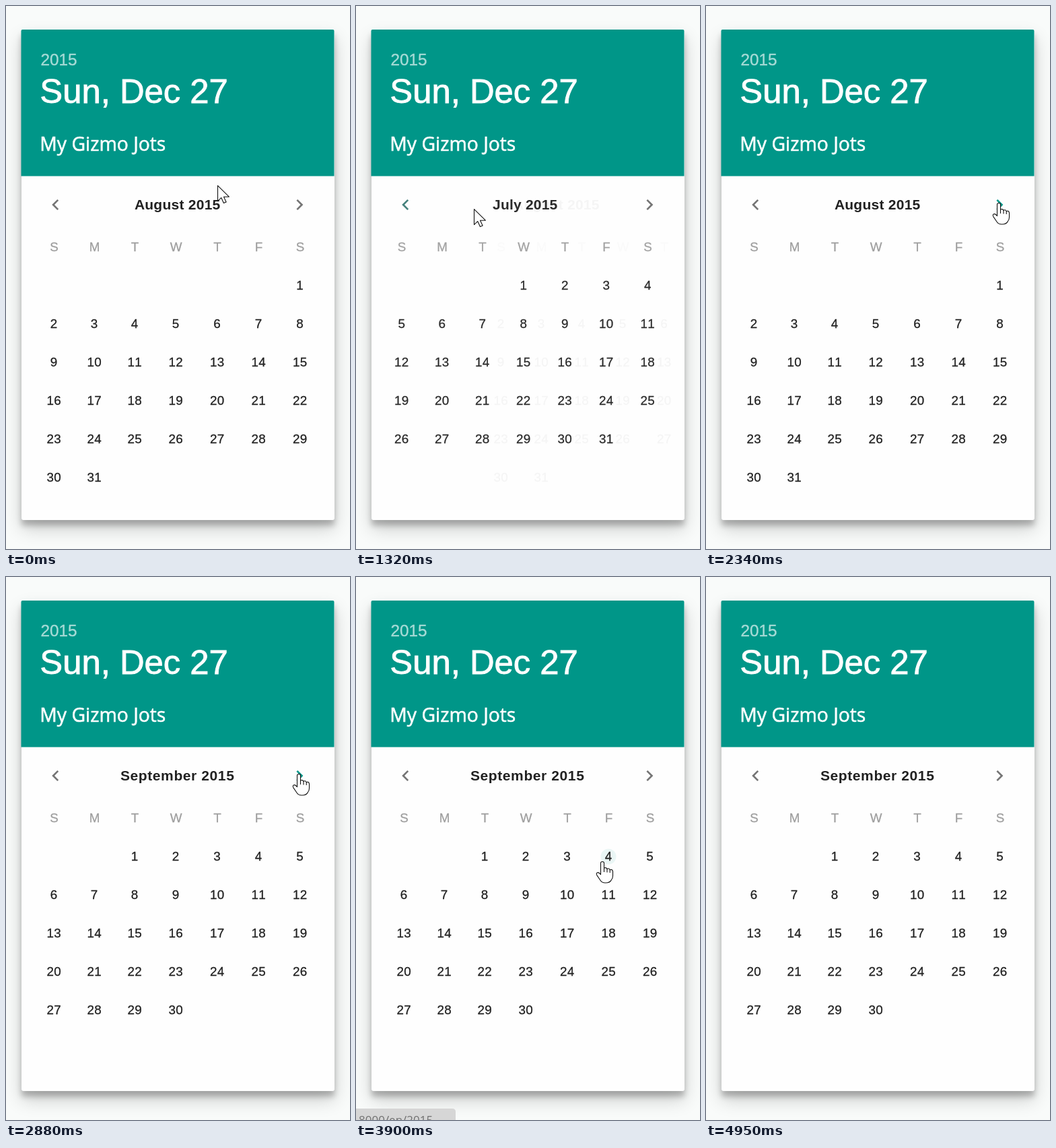
Write an HTML page that moves like this. It is 511 px wide and 806 px high and loops after 5220 ms.

```html
<!DOCTYPE html>
<html lang="en">
<head>
<meta charset="utf-8">
<title>Calendar</title>
<style>
  html, body { margin: 0; width: 100%; height: 100%; overflow: hidden; background: #f9fbfa; }
  .card {
    position: absolute; left: 22.5px; top: 35px; width: 465px; height: 728px;
    border-radius: 3px; background: #fefefe;
    box-shadow: 0 13px 27px rgba(0,0,0,.19), 0 8px 8px rgba(0,0,0,.23);
  }
  svg { position: absolute; left: 0; top: 0; display: block; }
  text { font-family: "Liberation Sans", Arial, sans-serif; font-kerning: none; }
  .mid { text-anchor: middle; }
  .day { font-size: 18.8px; letter-spacing: .3px; fill: #212121; stroke: #212121; stroke-width: .3; }
  .week { font-size: 18.8px; fill: #9e9e9e; stroke: #9e9e9e; stroke-width: .3; }
  .title { font-size: 21px; font-weight: bold; fill: #212121; }
  .head { fill: #fff; stroke: #fff; }
  .sans { font-family: "Open Sans", "Noto Sans", sans-serif; }
</style>
</head>
<body>
<div class="card"></div>
<svg id="stage" width="511" height="806" viewBox="0 0 511 806">
  <defs><clipPath id="pane"><rect x="40" y="256" width="430" height="480"/></clipPath></defs>
  <path d="M22.5 252.6V37q0-2 2-2h461q2 0 2 2V252.6z" fill="#009688"/>
  <text class="head" x="51.4" y="88" font-size="24.3" stroke-width=".4" opacity=".65">2015</text>
  <text class="head" x="50.3" y="144" font-size="50.8" stroke-width=".9">Sun, Dec 27</text>
  <text class="head sans" x="50.3" y="215" font-size="28.3" font-weight="500" stroke-width=".6">My Gizmo Jots</text>
  <g id="dots" fill="#009688"></g>
  <g id="months" clip-path="url(#pane)"></g>
  <path id="prev" transform="translate(57.4 278.8) scale(1.35)" d="M15.41 7.41L14 6l-6 6 6 6 1.41-1.41L10.83 12z"/>
  <path id="next" transform="translate(419.8 278.8) scale(1.35)" d="M10 6L8.59 7.41 13.17 12l-4.58 4.59L10 18l6-6z"/>
  <g id="status">
    <path d="M0 789H143q5 0 5 5V806H0z" fill="#d6d6d6"/>
    <text class="sans" x="4" y="812" font-size="17" fill="#707070">8000/en/2015</text>
  </g>
  <g id="cursor" fill="#fff" stroke="#111" stroke-width="1.1" stroke-linejoin="round">
    <path id="arrow" d="M.5.6V23.6L5.7 18.6 9.4 26.6 13.1 25 9.5 17.2H17.3z"/>
    <g id="hand">
      <path d="M-2.5 2.8Q-2.5.5 0 .5T2.5 2.8V10.5Q3.4 9.4 5 9.6T7 11.6Q7.6 10.5 9.2 10.8T11.2 13Q12 12 13.6 12.4T15.5 15V21.5Q15.5 25 13.4 27.5 11.5 32 4.5 32-.8 32-3 28.2L-8.2 20.6Q-9.6 17.6-7.4 16.7-5.2 16-2.5 19.6z"/>
      <path d="M2.5 10.5V16M7 11.6V16.5M11.2 13V17" fill="none"/>
    </g>
  </g>
</svg>
<script>
const LOOP = 5220, STEP = 30;
const COLS = [71, 131, 191, 252, 313.5, 375, 436.5];
const rowY = r => 415 + 57 * r;
const $ = id => document.getElementById(id);
const clamp = v => Math.max(0, Math.min(1, v));
const ramp = (t, from, span) => clamp((t - from) / span);
const pulse = (t, from, to, span) => ramp(t, from, span) - ramp(t, to, span);

function add(parent, tag, attrs, text) {
  const el = document.createElementNS('http://www.w3.org/2000/svg', tag);
  for (const k in attrs) el.setAttribute(k, attrs[k]);
  if (text !== undefined) el.textContent = text;
  return parent.appendChild(el);
}

function buildMonth(name, first, days, spacing) {
  const root = add($('months'), 'g', {});
  const title = add(root, 'g', {}), grid = add(root, 'g', {});
  const label = (parent, cls, x, y, text) => add(parent, 'text', { class: 'mid ' + cls, x, y }, text);
  label(title, 'title', 254.7, 302, name + ' 2015').style.letterSpacing = spacing + 'px';
  [...'SMTWTFS'].forEach((c, i) => label(grid, 'week', COLS[i] + .5, 364, c));
  for (let d = 1; d <= days; d++) {
    const cell = first + d - 1;
    label(grid, 'day', COLS[cell % 7] + .2, rowY(Math.floor(cell / 7)) + 6, d);
  }
  return { root, title, grid };
}

const july = buildMonth('July', 3, 31, .2);
const august = buildMonth('August', 6, 31, .25);
const september = buildMonth('September', 2, 30, .6);
const months = [july, august, september];

// start, month leaving, month entering, direction
const slides = [
  [1200, august, july, 1],
  [2190, july, august, -1],
  [2730, august, september, -1]
];

// row, hover start, hover end
const hovers = [[1, 3510, 3780], [0, 3840, 4350]].map(([row, from, to]) => ({
  from, to, dot: add($('dots'), 'circle', { cx: 375, cy: rowY(row) })
}));

// time, x, y of the pointer's tip
const path = [
  [180, 314, 266], [570, 78, 329], [720, 77, 309], [870, 74, 293],
  [1200, 74, 293], [1320, 175, 301], [1590, 446, 297], [1800, 446, 297],
  [1980, 435, 292], [2880, 435, 292], [3270, 378, 540], [3540, 370, 478],
  [3810, 367, 440], [3900, 366, 422], [4290, 366, 422], [4500, 440, 560],
  [4710, 494, 725], [4830, 474, 782]
];
const handTimes = [[810, 1230], [1920, 2940], [3480, 4380]];

function pointer(t) {
  const i = path.findIndex(p => p[0] > t);
  if (i < 1) return path[i ? path.length - 1 : 0].slice(1);
  const [t0, x0, y0] = path[i - 1], [t1, x1, y1] = path[i];
  const p = (t - t0) / (t1 - t0);
  return [x0 + (x1 - x0) * p, y0 + (y1 - y0) * p];
}

function place(month, titleX, gridX, opacity) {
  month.root.setAttribute('opacity', opacity);
  month.title.setAttribute('transform', `translate(${titleX})`);
  month.grid.setAttribute('transform', `translate(${gridX})`);
}

function drawMonths(t) {
  months.forEach(m => place(m, 0, 0, 0));
  const slide = slides.filter(s => t >= s[0]).pop();
  if (!slide) return place(august, 0, 0, 1);
  const [start, from, to, dir] = slide;
  const left = (1 - ramp(t, start, 150)) ** 2, done = 1 - left;
  place(from, dir * 45 * done, dir * 150 * done, left);
  place(to, -dir * 85 * left, -dir * 85 * left, done);
}

function tint(el, k) {
  const mix = (a, b) => Math.round(a + (b - a) * k);
  el.setAttribute('fill', `rgb(${mix(117, 0)},${mix(117, 150)},${mix(117, 136)})`);
}

function draw(t) {
  drawMonths(t);
  tint($('prev'), pulse(t, 780, 1230, 150));
  tint($('next'), pulse(t, 1890, 2910, 150));
  hovers.forEach(({ from, to, dot }) => {
    const k = pulse(t, from, to, 120);
    dot.setAttribute('r', 23 * k);
    dot.setAttribute('opacity', .16 * k);
  });
  $('status').setAttribute('opacity', pulse(t, 3480, 4830, 120));
  const [x, y] = pointer(t);
  const hand = handTimes.some(([a, b]) => t >= a && t < b);
  $('cursor').setAttribute('transform', `translate(${x.toFixed(1)} ${y.toFixed(1)})`);
  $('cursor').setAttribute('display', t < 4860 ? 'inline' : 'none');
  $('hand').setAttribute('display', hand ? 'inline' : 'none');
  $('arrow').setAttribute('display', hand ? 'none' : 'inline');
}

const begin = performance.now();
function tick() {
  const t = (performance.now() - begin) % LOOP;
  draw(Math.floor(t / STEP) * STEP);
  requestAnimationFrame(tick);
}
tick();
</script>
</body>
</html>
```
